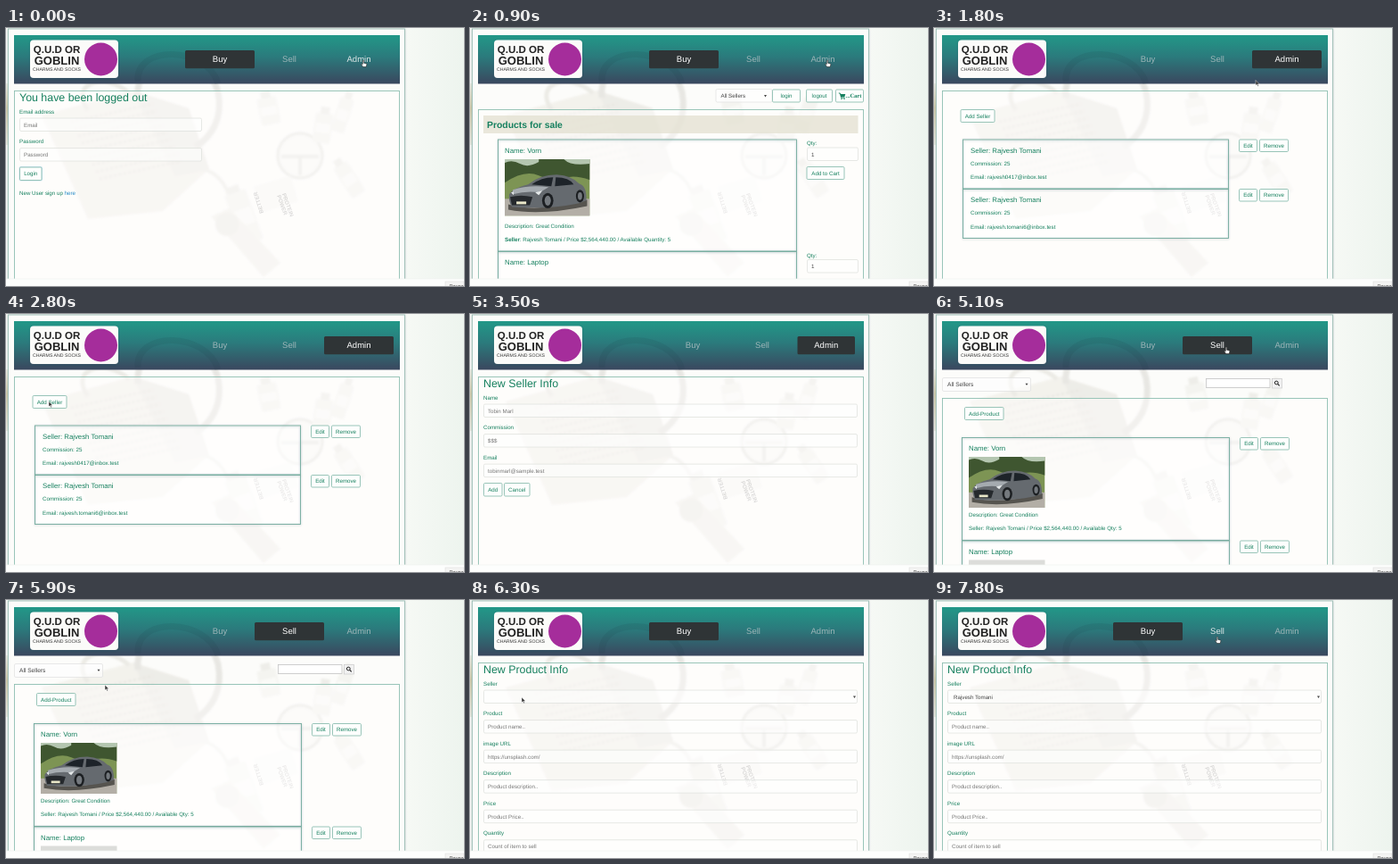
Recreate the animation shown at these times as an HTML page. Size 514 px wide and 289 px high, loop 8000 ms.

```html
<!DOCTYPE html>
<html lang="en">
<head>
<meta charset="utf-8">
<title>Shop walkthrough</title>
<style>
html, body { margin: 0; width: 100%; height: 100%; overflow: hidden; background: #f6f8f5; }
svg { display: block; width: 100vw; height: 100vh; }
text { font-family: "Liberation Sans", Arial, sans-serif; font-size: 6.2px; fill: #16805f; white-space: pre; text-rendering: geometricPrecision; }
.h { font-size: 12.4px; }
.n { font-size: 7.8px; }
.b { font-weight: 700; }
.g { fill: #777; }
.d { fill: #444; }
.nav { font-size: 9.5px; text-anchor: middle; }
.mid { text-anchor: middle; }
</style>
</head>
<body>
<svg id="stage" viewBox="0 0 514 289" preserveAspectRatio="none"></svg>
<script>
const LOOP = 8000;
const SELLER = "Rajvesh Tomani";
const CAR = "Vorn";

const rect = (x, y, w, h, fill, more = "") =>
  `<rect x="${x}" y="${y}" width="${w}" height="${h}" fill="${fill}" ${more}/>`;
const text = (x, y, s, cls = "", more = "") =>
  `<text x="${x}" y="${y}" class="${cls}" ${more}>${s}</text>`;
const path = (d, fill, more = "") => `<path d="${d}" fill="${fill}" ${more}/>`;
const line = (d, color, w) => path(d, "none", `stroke="${color}" stroke-width="${w}"`);

const button = (x, y, w, label, h = 14.5) =>
  rect(x + .5, y + .5, w - 1, h - 1, "#fdfefd", 'rx="1.2" stroke="#7fb7a8" stroke-width=".8"') +
  text(x + w / 2, y + h / 2 + 2.1, label, "mid");
const input = (x, y, w, label = "", cls = "g") =>
  rect(x + .5, y + .5, w - 1, 14.5, "#fff", 'fill-opacity=".55" rx="1.5" stroke="#e0e2df" stroke-width=".8"') +
  text(x + 5, y + 10, label, cls);
const caret = (x, y) => path(`M${x} ${y}h3l-1.5 2.4z`, "#444");
const card = (x, y, w, h) =>
  rect(x + .5, y + .5, w, h, "#fff", 'fill-opacity=".45"') +
  rect(x + .5, y + .5, w, h, "none", 'stroke="#72aa9d" stroke-width=".9" filter="url(#soft)"');
const panel = y =>
  rect(9.5, y + .5, 432, 290 - y, "#fffdfd", 'fill-opacity=".4" stroke="#8fbfb2" stroke-width=".9"');
const car = (x, y, w, h) => `<use href="#car" x="${x}" y="${y}" width="${w}" height="${h}"/>`;

const field = (row, label, hint, w = 420) =>
  text(15, 95.5 + row * 33.55, label) + input(15, 100.5 + row * 33.55, w, hint);

const defs = `<defs>
  <linearGradient id="head" x2="0" y2="1"><stop stop-color="#229888"/><stop offset=".45" stop-color="#2b7a7c"/><stop offset="1" stop-color="#3a475e"/></linearGradient>
  <linearGradient id="side"><stop stop-color="#f6f9f5"/><stop offset="1" stop-color="#edf4ee"/></linearGradient>
  <linearGradient id="edge" x2="0" y2="1"><stop stop-color="#eef0e6"/><stop offset=".4" stop-color="#d5d0af"/><stop offset="1" stop-color="#eceee4"/></linearGradient>
  <filter id="soft" x="-5%" y="-10%" width="110%" height="125%"><feDropShadow dx="0" dy=".6" stdDeviation=".8" flood-color="#345" flood-opacity=".3"/></filter>
  <filter id="blur"><feGaussianBlur stdDeviation=".9"/></filter>
  <clipPath id="page"><rect width="514" height="281"/></clipPath>
  <symbol id="car" viewBox="0 0 95 63" preserveAspectRatio="none">
    ${rect(0, 0, 95, 63, "#7d9454")}
    ${path("M0 0H95V23Q78 17 66 21T38 18T0 26Z", "#3f5630")}
    ${path("M0 4Q8 0 17 5T38 3V0H0ZM66 0Q74 8 95 5V0Z", "#b4c6b0")}
    ${rect(0, 44, 95, 19, "#b3aea6")}
    ${path("M4 50Q35 60 92 45V52Q40 63 4 56Z", "#56544f")}
    ${path("M5 39Q9 32 26 28Q39 17 58 17Q75 18 83 27Q92 30 91 46L82 49Q48 56 8 53Q4 47 5 39Z", "#656a6f")}
    ${path("M30 28Q41 20 54 20L52 30ZM57 20Q72 20 77 28L56 30Z", "#1d2329")}
    ${path("M9 34Q27 28 49 31L39 37Q24 35 9 39Z", "#a5abb0")}
    ${path("M6 42Q18 39 31 42L28 51H8Z", "#25292d")}
    ${path("M34 37l8-2-4 5zM7 37l3-1v4z", "#e5e9ea")}
    <ellipse cx="48" cy="46" rx="6.3" ry="8.500" fill="#1c1f22"/><ellipse cx="48" cy="46" rx="3.5" ry="5.500" fill="#74797e"/>
    <ellipse cx="84" cy="41" rx="4.5" ry="7" fill="#1c1f22"/><ellipse cx="84" cy="41" rx="2.4" ry="4.3" fill="#74797e"/>
    ${rect(13, 47, 11, 3, "#e9e7c9")}
  </symbol>
</defs>`;

// Faint still life behind the pages
function backdrop() {
  let weave = "";
  for (let r = 0; r < 9; r++)
    weave += path(`M${73 + r * 4} ${105 + r * 8}l92 -20`, "none",
      'stroke="#b9b7a8" stroke-width="2" stroke-dasharray="3 2.500"');
  const bottle = (x, y, a, w, h) => `<g transform="translate(${x} ${y}) rotate(${a})">` +
    rect(0, 0, w, h, "#e4e4dc", 'rx="3"') + rect(w * .25, -7, w * .5, 8, "#cfcec3") +
    rect(2, h * .35, w - 4, h * .3, "#f7f7f2") + "</g>";
  return `<g opacity=".3" filter="url(#blur)">
    ${path("M40 98L142 70L205 90L228 158L176 205L92 214Z", "#e0dccf")}
    ${path("M142 70L205 90L228 158L190 166Z", "#cecbc0")}
    ${weave}
    ${line("M148 78C143 25 225 21 238 72C244 102 230 122 213 133", "#bcbab0", 7)}
    ${line("M92 92C70 62 111 48 138 73", "#c8c5b8", 5)}
    ${line("M193 156Q238 151 250 187", "#d0cec4", 4)}
    <circle cx="330" cy="143" r="25" fill="#f3f3ee" stroke="#bdbdb4" stroke-width="3"/>
    ${line("M309 144H351M330 143V165", "#c4c4ba", 4)}
    ${bottle(281, 80, -12, 22, 31)}${bottle(348, 94, 8, 20, 34)}${bottle(376, 76, 18, 16, 40)}
    ${bottle(245, 188, -20, 25, 60)}${bottle(367, 158, -33, 18, 40)}
    ${path("M230 211l21 -9 57 61 -19 16z", "#dedbd0")}
    <circle cx="248" cy="220" r="13" fill="#d0cec3"/>
    <g transform="translate(278 178) rotate(-17)">${rect(0, 0, 43, 30, "#ededE7")}</g>
  </g>
  <g opacity=".3" transform="translate(289 207) rotate(-107)">${text(0, 0, "BETTER", "b d")}</g>
  <g opacity=".3" transform="translate(304 188) rotate(70)">${text(0, 0, "POWER", "b d")}${text(0, -6, "PROTEIN", "b d")}</g>`;
}

const frame = rect(0, 0, 514, 289, "#f8faf6") + rect(448, 0, 66, 289, "url(#side)") +
  rect(0, 62, 3, 69, "url(#edge)") +
  rect(2.5, 1, 445, 300, "#fcfcfa", 'stroke="#9bbdb5" stroke-width=".9" filter="url(#soft)"') + backdrop();

const header = rect(9, 8, 433, 54.5, "url(#head)") +
  line("M148 60C145 18 225 20 238 62", "rgba(20,50,60,.1)", 7) +
  rect(27, 13.5, 99, 42.5, "#fbfbf9", 'rx="4" filter="url(#soft)"') +
  text(57, 28, "Q.U.D OR", "b mid", 'style="font-size:11.5px;fill:#222"') +
  text(57, 41, "GOBLIN", "b mid", 'style="font-size:13px;fill:#222"') +
  text(57, 48, "CHARMS AND SOCKS", "mid", 'style="font-size:5.2px;fill:#333"') +
  '<circle cx="106.500" cy="35" r="18.500" fill="#a52d9b"/>';

const footer = rect(0, 281, 514, 8, "#fdfefd") + line("M0 281H514", "#eef1ee", .7) +
  rect(493, 284, 21, 6, "#f4f4f3", 'stroke="#ddd" stroke-width=".6"') +
  text(497.5, 290.5, "Reveal", "d", 'style="font-size:5.6px"');

const sellerRow = (y, mail) => card(32, y, 298, 55) +
  text(41, y + 15.3, `Seller: ${SELLER}`, "n") + text(41, y + 29, "Commission: 25") +
  text(41, y + 44.5, `Email: ${mail}`) +
  button(342, y, 21, "Edit") + button(365, y, 33, "Remove");

const productRow = (y, name) => card(31, y, 300, 115) + text(39, y + 15, `Name: ${name}`, "n") +
  button(343, y, 21, "Edit") + button(366, y, 33, "Remove");

const buyRow = (y, name) => card(31, y, 335, 125) + text(39, y + 15.3, `Name: ${name}`, "n") +
  text(378, y + 6.5, "Qty:") + input(378, y + 9, 58, "1", "d");

const basket = path("M415.500 74h5.800l-1 3.300h-4z", "#16805f") +
  line("M413.800 73h1.500l1.300 5h4", "#16805f", .9) +
  '<circle cx="417" cy="79.200" r=".8" fill="#16805f"/><circle cx="420" cy="79.200" r=".8" fill="#16805f"/>';

const pages = {
  login: panel(70) + text(15, 82, "You have been logged out", "h") +
    field(0, "Email address", "Email", 205) + field(1, "Password", "Password", 205) +
    rect(14.5, 155, 26.5, 16.5, "#cfe6f3", 'rx="2"') + button(15, 155.5, 25.5, "Login", 15.5) +
    text(15, 187, 'New User sign up <tspan fill="#2489c5">here</tspan>'),

  buy: panel(91) +
    rect(276, 68.5, 63, 14.5, "#fff", 'fill-opacity=".7" rx="1.5" stroke="#e0e0e0" stroke-width=".7"') +
    text(281.5, 78, "All Sellers", "d") + caret(330, 75) +
    button(339, 68.5, 32, "login", 15) + button(377, 68.5, 30, "logout", 15) +
    button(410, 68.5, 32, "", 15) + basket +
    text(421.5, 78, "...Cart", "b", 'style="font-family:\'Liberation Serif\',serif;font-size:6.5px"') +
    rect(15, 98, 420.5, 20, "#e3e1d1", 'fill-opacity=".75"') +
    text(19, 111.5, "Products for sale", "b", 'style="font-size:10.4px"') +
    buyRow(124.5, CAR) + buyRow(250, "Laptop") + car(39, 147, 95.5, 63.5) +
    text(39, 223.5, "Description: Great Condition") +
    text(39, 239, `<tspan font-weight="700">Seller</tspan>: ${SELLER} / Price $2,564,440.00 / Available Quantity: 5`) +
    button(377.5, 155, 43, "Add to Cart", 15),

  admin: panel(70) + button(29.5, 91, 39, "Add Seller", 15) +
    sellerRow(124.5, "rajvesh0417@inbox.test") + sellerRow(180, "rajvesh.tomani6@inbox.test"),

  seller: panel(70) + text(15, 82, "New Seller Info", "h") +
    field(0, "Name", "Tobin Marl") + field(1, "Commission", "$$$") +
    field(2, "Email", "tobinmarl@sample.test") +
    button(15, 189, 21.5, "Add", 15.5) + button(38, 189, 29.5, "Cancel", 15.5),

  sell: panel(94) +
    rect(9.5, 71.5, 99, 15, "#fff", 'fill-opacity=".6" rx="1.5" stroke="#e0e0e0" stroke-width=".7"') +
    text(15, 81.2, "All Sellers", "d", 'style="font-size:6.6px"') + caret(102.5, 77.7) +
    rect(305.5, 72.5, 71.5, 10, "#fff", 'stroke="#c4c4c4" stroke-width=".8"') +
    rect(379.5, 72.5, 11, 10.5, "#f2f2f2", 'stroke="#cacaca" stroke-width=".7"') +
    '<circle cx="384.300" cy="77" r="1.900" fill="none" stroke="#222"/>' + line("M385.700 78.400l2 2", "#222", 1.2) +
    button(34, 104, 44.5, "Add-Product", 15) +
    productRow(138, CAR) + productRow(253.5, "Laptop") + car(39, 160, 85.5, 57) +
    text(39, 226.5, "Description: Great Condition") +
    text(39, 242, `Seller: ${SELLER} / Price $2,564,440.00 / Available Qty: 5`) +
    rect(39, 275.5, 85.5, 8, "#dcddda"),

  product: panel(70) + text(15, 82, "New Product Info", "h") +
    field(0, "Seller", "") + caret(430, 107.5) +
    `<g id="chosen">${text(22, 110.7, SELLER, "d")}</g>` +
    field(1, "Product", "Product name..") + field(2, "image URL", "https://unsplash.com/") +
    field(3, "Description", "Product description..") + field(4, "Price", "Product Price..") +
    field(5, "Quantity", "Count of item to sell")
};

const tabNames = ["Buy", "Sell", "Admin"];
const stage = document.getElementById("stage");
stage.innerHTML = defs + `<g clip-path="url(#page)">${frame}${header}` +
  rect(0, 25, 0, 20.3, "#2f3436", 'id="pill" rx="1.5"') +
  tabNames.map(s => text(0, 38.2, s, "nav", 'data-tab=""')).join("") +
  Object.entries(pages).map(([k, v]) => `<g id="p-${k}">${v}</g>`).join("") + "</g>" + footer +
  `<g id="cursor">
    <path id="arrow" d="M0 0V5.800L1.400 4.600L2.400 6.800L3.300 6.400L2.400 4.300H4.200Z" fill="#333" stroke="#fff" stroke-width=".4"/>
    <path id="hand" d="M-.700 -1.500Q0 -2.300 .7 -1.500V1.300L3.400 1.900Q4.100 2.200 3.900 3L3.200 5.600H-.300L-2.300 2.700Q-2.200 1.800 -.700 2.600Z" fill="#fff" stroke="#222" stroke-width=".6"/>
  </g>`;

const el = id => document.getElementById(id);
const tabs = [...stage.querySelectorAll("[data-tab]")];

// start, page, active tab
const scenes = [
  [0, "login", 0], [900, "buy", 0], [1500, "admin", 2],
  [3000, "seller", 2], [4600, "sell", 1], [6100, "product", 0]
];
// time, x, y
const trail = [
  [0, 401, 38], [1400, 401, 38], [1800, 361, 58.5], [2600, 48, 98], [3700, 48, 98],
  [4500, 328, 39], [5400, 328, 39], [6100, 58, 109], [7000, 58, 109], [7800, 318, 43], [LOOP, 318, 43]
];

function pointer(t) {
  const i = trail.findIndex(p => p[0] > t);
  const [a, b] = [trail[i - 1], trail[i]];
  const k = (t - a[0]) / (b[0] - a[0]);
  const e = k * k * (3 - 2 * k);
  return [a[1] + (b[1] - a[1]) * e, a[2] + (b[2] - a[2]) * e];
}

const show = (id, on) => el(id).style.display = on ? "" : "none";

function draw(t) {
  const [, page, active] = scenes.filter(s => s[0] <= t).pop();
  Object.keys(pages).forEach(k => show("p-" + k, k === page));
  show("chosen", t >= 6600);

  const narrow = t >= 3300 && t < 4600;
  const left = narrow ? [211, 289, 367.5] : [201, 279, 357];
  const width = narrow ? [78, 78, 64.5] : [78, 78, 78];
  el("pill").setAttribute("x", left[active]);
  el("pill").setAttribute("width", width[active]);

  const [x, y] = pointer(t);
  const overNav = y > 24 && y < 46 && x > left[0] && x < left[2] + width[2];
  tabs.forEach((n, i) => {
    const hover = overNav && x >= left[i] && x < left[i] + width[i] && !(t >= 200 && t < 1400);
    n.setAttribute("x", left[i] + width[i] / 2);
    n.style.fill = i === active ? "#fff" : hover ? "#dfe8e8" : "#9db5b8";
  });

  el("cursor").setAttribute("transform", `translate(${x.toFixed(2)} ${y.toFixed(2)})`);
  show("cursor", t < 3300 || t >= 3700);
  show("hand", overNav);
  show("arrow", !overNav);
}

const start = performance.now();
function tick(now) {
  draw(Math.max(0, now - start) % LOOP);
  requestAnimationFrame(tick);
}
draw(0);
requestAnimationFrame(tick);
</script>
</body>
</html>
```
